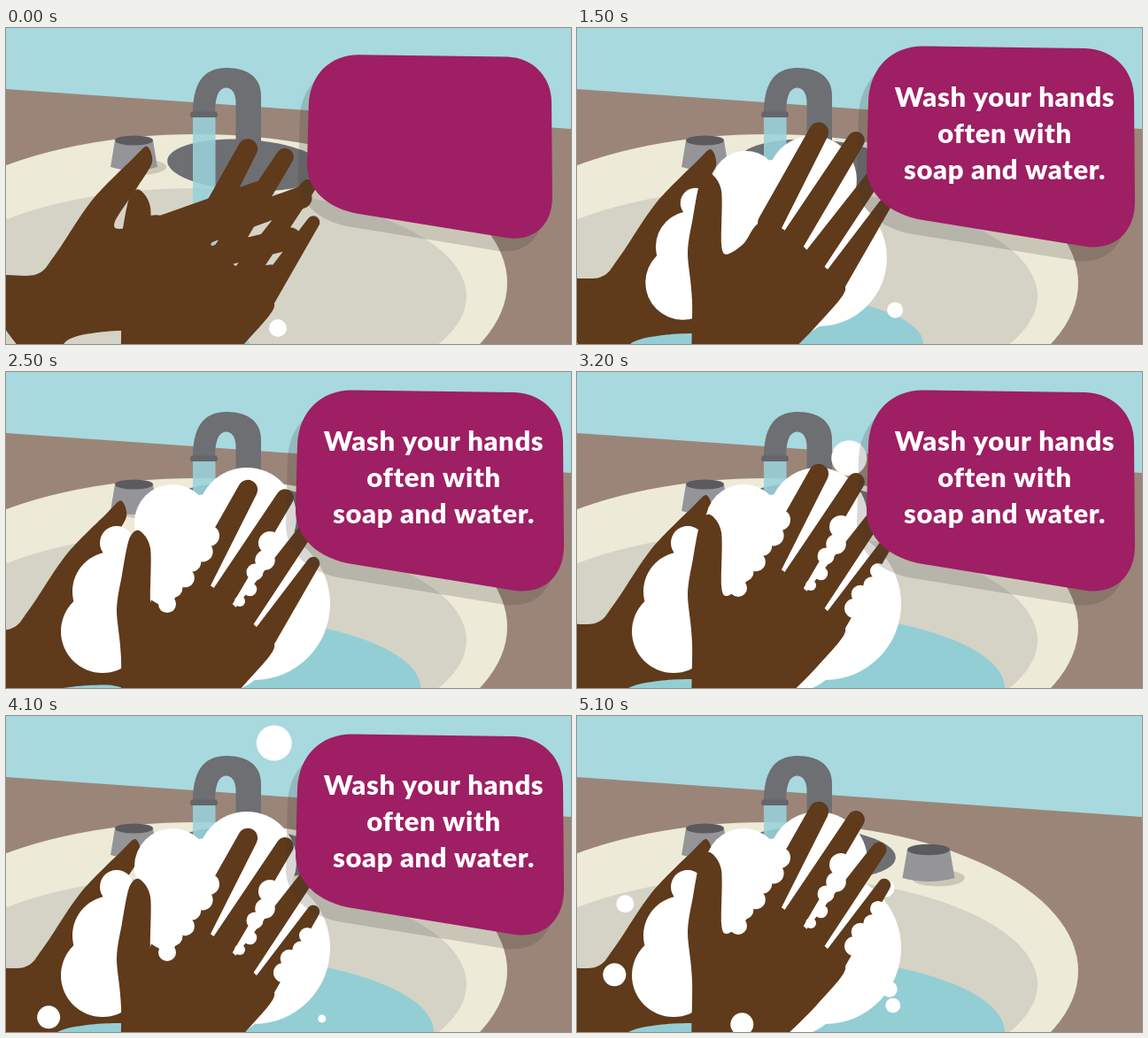
Write an HTML page with a canvas that moves like this. It is 638x357 px and loops after 5.2 s.

```html
<!DOCTYPE html>
<html lang="en">
<head>
<meta charset="utf-8">
<title>Wash your hands</title>
<style>
html, body { margin: 0; width: 100%; height: 100%; overflow: hidden; background: #a8d9df; }
canvas { display: block; }
</style>
</head>
<body>
<canvas id="stage" width="638" height="357"></canvas>
<script>
const ctx = document.getElementById('stage').getContext('2d');
const LOOP = 5200, STEP = 100, TAU = Math.PI * 2;
const SKIN = '#5f3a1b', WHITE = '#fff', WATER = '#93ced5', METAL = '#6e6f73';

const clamp = v => Math.max(0, Math.min(1, v));
const mix = (a, b, k) => a + (b - a) * k;
const easeOut = (t, from, to) => 1 - (1 - clamp((t - from) / (to - from))) ** 3;

function track(keys, t) {
  const i = keys.findIndex(key => t <= key[0]);
  if (i < 0) return keys[keys.length - 1][1];
  if (i === 0) return keys[0][1];
  const [t0, v0] = keys[i - 1], [t1, v1] = keys[i];
  return mix(v0, v1, (t - t0) / (t1 - t0));
}

function ellipse(x, y, rx, ry, color, tilt = 0) {
  ctx.fillStyle = color;
  ctx.beginPath();
  ctx.ellipse(x, y, rx, ry, tilt, 0, TAU);
  ctx.fill();
}

const circle = (x, y, r, color = WHITE) => ellipse(x, y, r, r, color);

function fillPath(d, color) {
  ctx.fillStyle = color;
  ctx.fill(typeof d === 'string' ? new Path2D(d) : d);
}

// Tapered limb with round ends.
function limb(x0, y0, r0, x1, y1, r1) {
  const angle = Math.atan2(y1 - y0, x1 - x0);
  ctx.fillStyle = SKIN;
  ctx.beginPath();
  ctx.arc(x0, y0, r0, angle + TAU / 4, angle - TAU / 4);
  ctx.arc(x1, y1, r1, angle - TAU / 4, angle + TAU / 4);
  ctx.fill();
}

// Closed curve that passes through every point.
function smooth(text) {
  const p = text.trim().split(/\s+/).map(s => s.split(',').map(Number));
  const n = p.length, path = new Path2D();
  path.moveTo(...p[0]);
  for (let i = 0; i < n; i++) {
    const a = p[(i + n - 1) % n], b = p[i], c = p[(i + 1) % n], d = p[(i + 2) % n];
    path.bezierCurveTo(b[0] + (c[0] - a[0]) / 7, b[1] + (c[1] - a[1]) / 7,
                       c[0] - (d[0] - b[0]) / 7, c[1] - (d[1] - b[1]) / 7, c[0], c[1]);
  }
  path.closePath();
  return path;
}

function scaleAround(x, y, k) {
  ctx.translate(x, y);
  ctx.scale(k, k);
  ctx.translate(-x, -y);
}

const frontPalm = smooth(`150,155 139,165 131,205 125,245 130,300 132,420 170,420 238,360
  272,326 303,287 284,265 232,218 205,212 188,235 169,247 163,235 163,175`);
const frontTips = [[273, 109], [315, 118], [341, 152], [347, 192]];

const backPalm = smooth(`-44,292 20,284 42,262 84,200 130,153 146,139 152,157 136,184
  110,224 118,232 166,219 240,300 180,350 130,347 92,349 58,357 20,385`);
const backTips = [[272, 191], [320, 197], [308, 243], [286, 285]];

const panel = new Path2D('M329 82C331 44 356 20.500 391 20.500L574 23C607 24 629 49 629 79' +
  'L630 196C630 231 607 251 575 247L391 217C353 211 326 187 327 155Z');

const foam = [[272, 164, 56], [280, 262, 86], [245, 305, 56], [188, 170, 43], [190, 222, 44],
              [228, 190, 52], [125, 193, 19], [120, 248, 45], [109, 293, 47]];

function drawBubbles(list, t) {
  for (const [born, life, x, y, size] of list) {
    const age = t - born;
    if (age < 0 || age > life) continue;
    const sway = .4 * size * Math.sin(t / 2800 * TAU);
    circle(x + sway, y - 3.7 * size * age / 1000, size * mix(.5, 1, clamp(age / 700)));
  }
}

function drawKnob(x, y, r, height) {
  const foot = r * 1.23, base = y + height;
  ellipse(x + r * .45, base, r * 1.25, r * .4, 'rgba(110,105,95,.27)');
  fillPath(`M${x - r} ${y}L${x - foot} ${base}Q${x} ${base + 8} ${x + foot} ${base}L${x + r} ${y}Z`, '#959499');
  ellipse(x, y, r, r * .26, '#5b5a5f');
}

function drawRoom(t) {
  ctx.fillStyle = '#a8d9df';
  ctx.fillRect(0, 0, 638, 357);
  fillPath('M0 69L638 114V357H0Z', '#9b8579');
  ellipse(215, 288, 351, 168, '#edead8');
  ellipse(215, 303, 305, 122, '#d5d3c6');
  const pool = Math.min(258, 50 + t * .0773);
  ellipse(225, 357, pool, pool / 3, WATER);
  ellipse(271, 155, 89, 29, METAL, .06);
  drawKnob(144.5, 127, 21.5, 30);
  drawKnob(397, 151, 24, 32);
  fillPath('M211 97C211 65 221 45 249 45C273 45 288 56 288 76V142H259.500V83' +
    'C259 73 255 67.500 248 67.500C240 68 236 78 236 97Z', METAL);
  ctx.fillStyle = 'rgba(152,211,219,.87)';
  ctx.fillRect(211, 99, 25.5, 151);
  fillPath('M209 94.500H238Q240 98 238 101H209Q207 98 209 94.500Z', '#65666b');
}

function drawBackHand(t, soap) {
  const slide = track([[0, 13], [700, -1], [1500, 5], [2500, -16], [3200, 0], [5100, 0]], t);
  ctx.save();
  ctx.translate(slide, -slide * .4);
  fillPath(backPalm, SKIN);
  backTips.forEach(([x, y], i) => {
    const rootX = 155 + 6 * i, rootY = 233 + 22 * i, reach = 1 - .4 * soap;
    limb(rootX, rootY, 13, mix(rootX, x, reach), mix(rootY, y, reach), 12.5);
  });
  ctx.restore();
}

function drawFoam(soap) {
  ctx.save();
  scaleAround(210, 240, soap);
  for (const [x, y, r] of foam) circle(x, y, r);
  ctx.restore();
}

// A row of soap blobs along a finger.
function drawSuds(count, grow, x0, y0, r0, x1, y1, r1) {
  if (grow <= 0) return;
  for (let i = 0; i < count; i++) {
    const k = i / (count - 1), wobble = i % 2 ? 2 : -1;
    circle(mix(x0, x1, k) + wobble, mix(y0, y1, k) + wobble, mix(r0, r1, k) * grow);
  }
}

function drawFrontHand(t) {
  const s = t / 100 - 15;
  const cycles = 3.292 + s * (s < 0 ? .224 : .258);
  ctx.save();
  ctx.translate(0, 13 + 16 * Math.cos(cycles * TAU));
  fillPath(frontPalm, SKIN);
  frontTips.forEach(([x, y], i) => limb(218 + 24 * i, 212 + 22 * i, 14, x, y, 11.2 - 1.3 * i));
  drawSuds(6, easeOut(t, 1900, 2400), 230, 162, 12, 180, 236, 10);
  drawSuds(5, easeOut(t, 2000, 2450), 299, 170, 13, 265, 236, 6);
  drawSuds(4, easeOut(t, 2600, 3150), 341, 220, 9, 311, 259, 11);
  ctx.restore();
}

function drawPanel(t) {
  const size = track([[0, .914], [100, 1.02], [300, 1], [4700, 1], [4800, 1.025],
                      [4900, .914], [5100, 0]], t);
  if (size <= 0) return;
  ctx.save();
  scaleAround(478, 134.5, size);
  ctx.save();
  ctx.translate(-11, 16);
  fillPath(panel, 'rgba(60,55,50,.2)');
  ctx.restore();
  fillPath(panel, '#9e1f63');

  const textSize = track([[100, 0], [300, 1.04], [500, 1]], t);
  if (textSize > 0) {
    scaleAround(484, 120, textSize);
    ctx.fillStyle = WHITE;
    ctx.textAlign = 'center';
    ctx.font = '900 31px Lato, sans-serif';
    ctx.letterSpacing = '0.6px';
    ['Wash your hands', 'often with', 'soap and water.']
      .forEach((line, i) => ctx.fillText(line, 483, 89 + 41 * i));
  }
  ctx.restore();
}

// Each bubble: birth, lifetime, x, y, size
const bubblesBehind = [
  [0, 900, 307, 339, 20],
  [800, 1000, 360, 342, 9],
  [2500, 2200, 301, 149, 20],
  [4000, 1200, 58, 253, 10],
  [4100, 1200, 356, 342, 9],
  [4500, 1200, 360, 347, 9],
  [4200, 1200, 352, 228, 10]
];
const bubblesFront = [[3400, 1800, 47, 374, 13], [4400, 1800, 191, 382, 13]];

function draw(now) {
  const t = Math.floor(now % LOOP / STEP) * STEP;
  const soap = easeOut(t, 650, 2250);
  drawRoom(t);
  drawBubbles(bubblesBehind, t);
  drawBackHand(t, soap);
  drawFoam(soap);
  drawFrontHand(t);
  drawBubbles(bubblesFront, t);
  drawPanel(t);
}

const begin = performance.now();
function loop() {
  draw(performance.now() - begin);
  requestAnimationFrame(loop);
}
loop();
</script>
</body>
</html>
```
